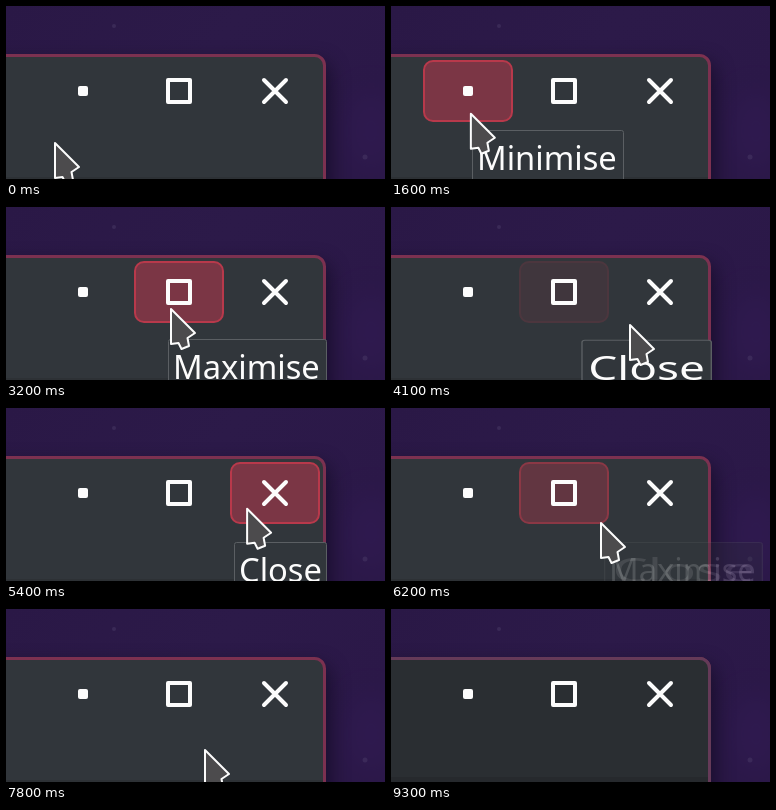
An HTML page for the animation above (9.4 s loop, 379 by 173 pixels).

```html
<!DOCTYPE html>
<html lang="en">
<head>
<meta charset="utf-8">
<title>Window buttons</title>
<style>
  html, body { margin: 0; width: 100%; height: 100%; overflow: hidden; background: #2b1947; }
  svg { display: block; width: 379px; height: 173px; }
  .shadow { fill: #0b0618; opacity: .6; filter: blur(10px); }
  .glow { fill: #351d59; opacity: .4; filter: blur(14px); }
  .hover rect { fill: #7b3645; stroke: #b8394b; stroke-width: 2; }
  .icon { fill: none; stroke: #fcfcfc; stroke-width: 4; stroke-linejoin: round; stroke-linecap: round; }
  .tip rect { fill: #31363b; stroke: #5b5f63; }
  .tip text { font: 32.7px "Noto Sans", sans-serif; fill: #fcfcfc; }
  #cursor { fill: #4c4b4d; stroke: #fcfcfc; stroke-width: 2; stroke-linejoin: round; }
</style>
</head>
<body>
<svg viewBox="0 0 379 173">
  <defs>
    <linearGradient id="sky" x2="1" y2=".4">
      <stop offset="0" stop-color="#2a1846"/>
      <stop offset=".55" stop-color="#2c1a49"/>
      <stop offset="1" stop-color="#2b1848"/>
    </linearGradient>
  </defs>
  <rect width="379" height="173" fill="url(#sky)"/>
  <ellipse class="glow" cx="365" cy="125" rx="24" ry="40"/>
  <g fill="#4a3a66" opacity=".5">
    <circle cx="108" cy="20" r="2"/>
    <circle cx="359" cy="151" r="2.5"/>
  </g>
  <rect class="shadow" x="-40" y="56" width="364" height="170" rx="12"/>

  <rect x="-20" y="49.5" width="338.5" height="160" rx="10" fill="#31363b" stroke="#7c3150" stroke-width="3"/>
  <rect y="171" width="317" height="2" fill="#2d3135"/>
  <g id="inactive">
    <rect x="-20" y="49.5" width="338.5" height="160" rx="10" fill="#2a2e32" stroke="#653a58" stroke-width="3"/>
    <rect y="168" width="317" height="5" fill="#26292d"/>
  </g>

  <g class="hover">
    <rect id="hoverMin" x="33" y="55" width="88" height="60" rx="9"/>
    <rect id="hoverMax" x="129" y="55" width="88" height="60" rx="9"/>
    <rect id="hoverClose" x="225" y="55" width="88" height="60" rx="9"/>
  </g>
  <rect x="72" y="80" width="10" height="10" rx="2" fill="#fcfcfc"/>
  <g class="icon">
    <rect x="162" y="74" width="22" height="22"/>
    <path d="M258 74l22 22m0-22l-22 22"/>
  </g>

  <g class="tip" id="tipMin"><rect x=".5" y=".5" width="151" height="56" rx="2"/><text x="5" y="40">Minimise</text></g>
  <g class="tip" id="tipMax"><rect x=".5" y=".5" width="158" height="56" rx="2"/><text x="5" y="40">Maximise</text></g>
  <g class="tip" id="tipClose"><rect x=".5" y=".5" width="92" height="56" rx="2"/><text x="5" y="40">Close</text></g>

  <path id="cursor" d="M0 -1V34L7.500 33L10.500 39L18 36L16.500 28L24 23Z"/>
</svg>
<script>
  const LOOP = 9400, STEP = 100, FADE = 300;
  const $ = id => document.getElementById(id);
  const ramp = (t, from, to) => Math.min(1, Math.max(0, (t - from) / (to - from)));
  const mix = (a, b, p) => a.map((v, i) => v + (b[i] - v) * p);

  // Visible from one time to another, with equal fades at both ends.
  const span = (t, from, to, len = FADE) => ramp(t, from, from + len) - ramp(t, to, to + len);

  const opacity = {
    hoverMin: t => span(t, 600, 1900),
    hoverMax: t => span(t, 2200, 3860) + span(t, 6000, 7400),
    hoverClose: t => span(t, 4200, 5500),
    tipMin: t => span(t, 1200, 1900),
    tipMax: t => span(t, 2600, 3800, 100) + span(t, 6150, 6600),
    tipClose: t => span(t, 3800, 5930),
    inactive: t => ramp(t, 9100, 9300)
  };

  // The pointer rests between strokes.
  const home = [49, 138];
  const strokes = [
    { from: 200, to: 900, pos: [78, 105] },
    { from: 1500, to: 2200, pos: [91, 131] },
    { from: 2200, to: 2400, pos: [198, 113] },
    { from: 2600, to: 2700, pos: [165, 103] },
    { from: 3300, to: 3500, pos: [177, 130] },
    { from: 3600, to: 4600, pos: [301, 108] },
    { from: 4600, to: 4800, pos: [245, 100] },
    { from: 5300, to: 6200, pos: [210, 116] },
    { from: 6300, to: 6400, pos: [205, 111] },
    { from: 7300, to: 7800, pos: [199, 142] },
    { from: 7800, to: 8300, pos: [94, 176] }
  ];
  const pointer = t => strokes.reduce((p, s) => mix(p, s.pos, ramp(t, s.from, s.to)), home);

  // Tooltip boxes as left, top, width; Close morphs out of one and into the other.
  const minBox = [81, 124, 152], maxBox = [162, 132, 159], closeBox = [228, 134, 93], backBox = [213, 134, 159];
  const morph = t => mix(mix(maxBox, closeBox, ramp(t, 3800, 4500)), backBox, ramp(t, 5900, 6200));

  function place(id, [x, y, w], natural = w) {
    const scale = w ? ` scale(${w / natural} 1)` : "";
    $(id).setAttribute("transform", `translate(${x} ${y})${scale}`);
  }

  function draw(now) {
    const t = Math.floor(now % LOOP / STEP) * STEP;
    for (const id in opacity) $(id).setAttribute("opacity", opacity[id](t));
    place("tipMin", minBox);
    place("tipMax", t < LOOP / 2 ? maxBox : backBox);
    place("tipClose", morph(t), closeBox[2]);
    place("cursor", pointer(t));
  }

  let start;
  function tick(now) {
    start ??= now;
    draw(now - start);
    requestAnimationFrame(tick);
  }
  draw(0);
  requestAnimationFrame(tick);
</script>
</body>
</html>
```
